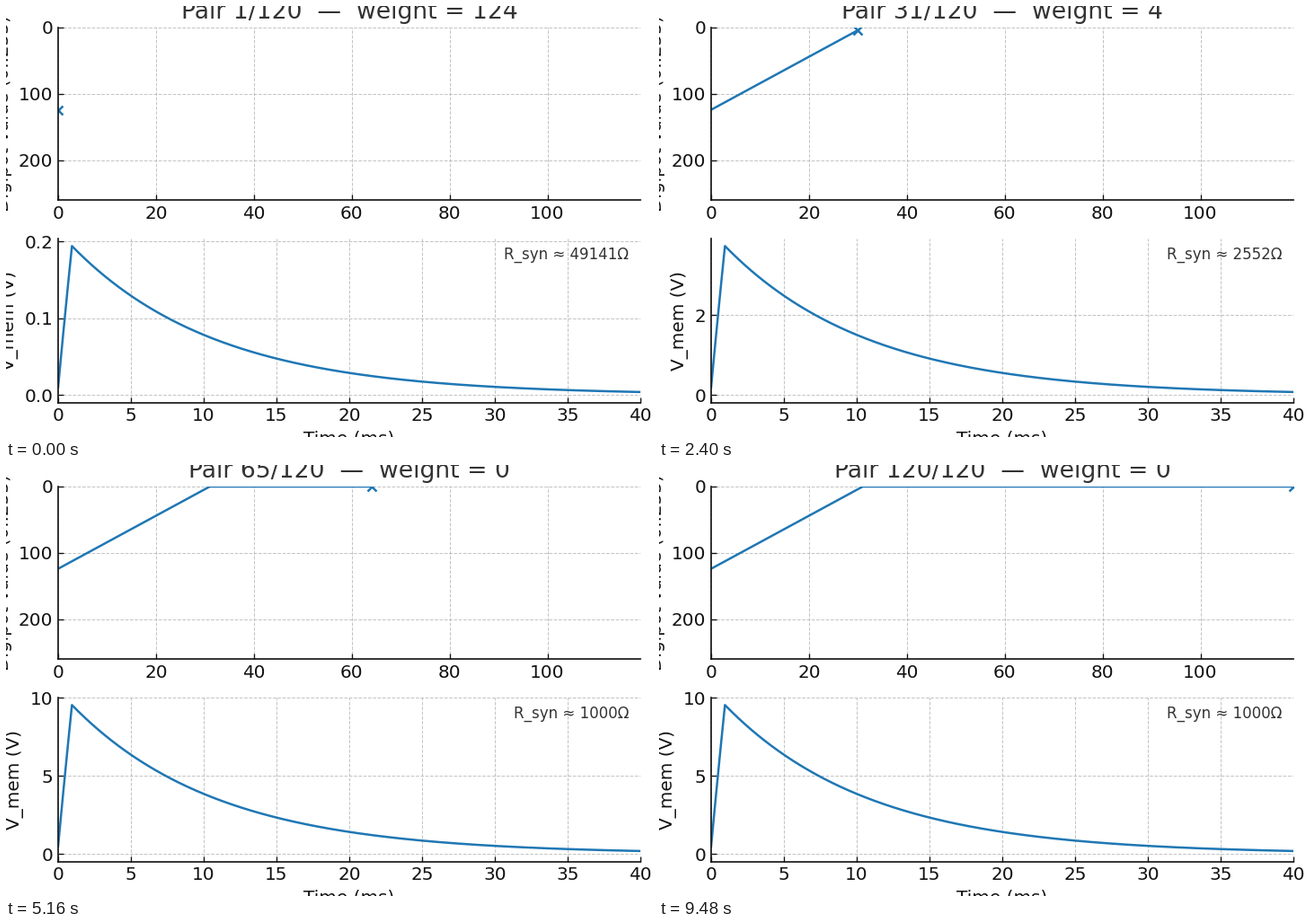
A matplotlib script that plays this animation: 720 px wide and 480 px high, repeating every 9.6 s.

```python
import numpy as np
import matplotlib.pyplot as plt
from matplotlib.animation import FuncAnimation

W, H, DPI = 720, 480, 120
FRAMES, LOOP_MS = 80, 9600
PAIRS = 120
INK, SOFT, BLUE = "#111111", "#333333", "#1f77b4"

plt.rcParams.update({
    "font.family": "DejaVu Sans",
    "font.size": 12,
    "axes.labelsize": 12,
    "axes.titlesize": 16,
    "xtick.labelsize": 12,
    "ytick.labelsize": 12,
    "xtick.direction": "in",
    "ytick.direction": "in",
    "xtick.color": INK,
    "ytick.color": INK,
    "axes.labelcolor": INK,
    "axes.edgecolor": INK,
    "axes.linewidth": 1.0,
    "axes.spines.top": False,
    "axes.spines.right": False,
    "axes.grid": True,
    "grid.color": "#b0b0b0",
    "grid.alpha": 0.75,
    "grid.linestyle": "--",
    "grid.linewidth": 0.6,
})

# Synapse weight falls by 4 per spike pair until it reaches zero.
pairs = np.arange(PAIRS)
weights = np.maximum(124 - 4 * pairs, 0)
shown = np.linspace(0, PAIRS - 1, FRAMES).astype(int)

# Leaky membrane: 1 ms input pulse, then decay.
DT, TAU, PULSE = 0.05, 10.0, 1.0
time = np.arange(0, 40, DT)


def resistance(weight):
    return 1000 + 99000 * weight / 255


def membrane():
    v, trace = 0.0, []
    for step in range(len(time)):
        drive = 10.0 if step < round(PULSE / DT) else 0.0
        v += DT * (drive - v / TAU)
        trace.append(v)
    return np.array(trace)


unit_trace = membrane()

fig = plt.figure(figsize=(W / DPI, H / DPI), dpi=DPI, facecolor="white")


def panel(left, top, right, bottom):
    return fig.add_axes([left / W, 1 - bottom / H,
                         (right - left) / W, (bottom - top) / H])


ax_w = panel(58, 24, 706, 216)
ax_w.set_xlim(0, PAIRS - 1)
ax_w.set_ylim(260, 0)
ax_w.set_ylabel("Digipot value (0..255)")
title = ax_w.set_title("", color=SOFT, pad=6, y=1.0)
history, = ax_w.plot([], [], color=BLUE, lw=1.5)
head, = ax_w.plot([], [], "x", color=BLUE, ms=6, mew=1.5)

ax_v = panel(58, 259, 706, 441.5)
ax_v.set_xlim(0, 40)
ax_v.set_xlabel("Time (ms)")
ax_v.set_ylabel("V_mem (V)")
curve, = ax_v.plot([], [], color=BLUE, lw=1.5)
label = ax_v.text(0.98, 0.95, "", transform=ax_v.transAxes,
                  ha="right", va="top", fontsize=10, color=SOFT)


def update(frame):
    i = shown[frame]
    weight = weights[i]
    r = resistance(weight)
    trace = unit_trace * 1000 / r
    peak = trace.max()

    history.set_data(pairs[:i + 1], weights[:i + 1])
    head.set_data([i], [weight])
    title.set_text(f"Pair {i + 1}/{PAIRS}  —  weight = {weight}")

    curve.set_data(time, trace)
    ax_v.set_ylim(-0.05 * peak, 1.05 * peak)
    label.set_text(f"R_syn ≈ {int(r)}Ω")
    return history, head, title, curve, label


anim = FuncAnimation(fig, update, frames=FRAMES, interval=LOOP_MS / FRAMES,
                     init_func=lambda: update(0), repeat=True,
                     repeat_delay=0, blit=False)
plt.show()
```
